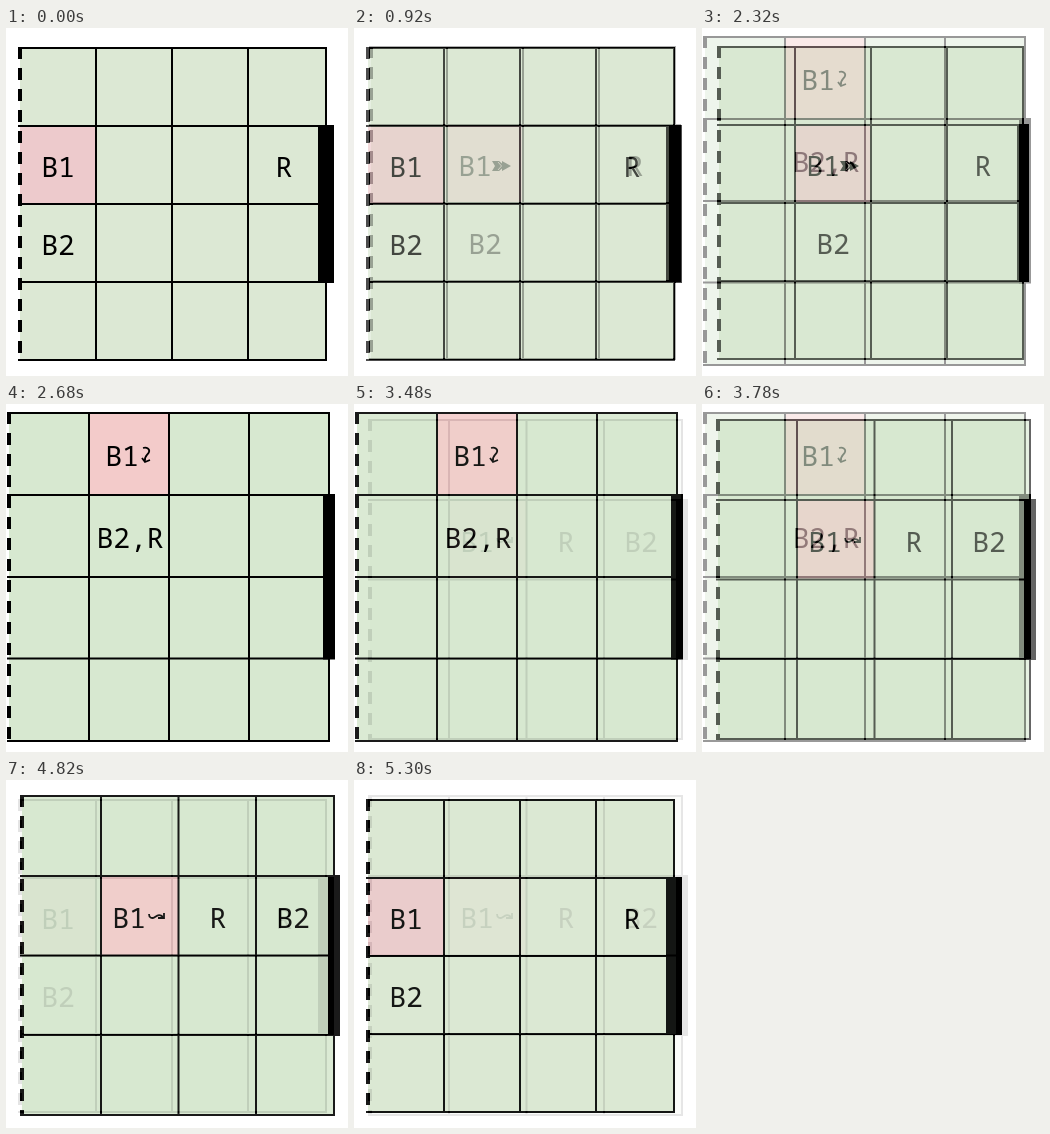
These frames come from a looping animation (342x348 px, 5.36 s). An HTML page:

```html
<!DOCTYPE html>
<html lang="en">
<head>
<meta charset="utf-8">
<title>Grid moves</title>
<style>
html, body { margin: 0; width: 100%; height: 100%; overflow: hidden; background: #fff; }
svg { position: absolute; left: 0; top: 0; width: 342px; height: 348px; }
text { font: 28px "Noto Sans Mono", monospace; }
</style>
</head>
<body>
<script>
const HOLD = 800, STEP = 60, STEPS = 9, PART = HOLD + STEP * STEPS;

const arrows = {
  right: '<path d="M138 133h7l3 2.5v-2.5l9 5-9 5v-2.5l-3 2.500h-7l3-5z"/>' +
    '<path d="M144 134l3.500 4-3.500 4" fill="none" stroke="#edcacc" stroke-width=".8"/>',
  down: '<g fill="none" stroke="#000" stroke-width="1.8">' +
    '<path d="M137 44c4-1 7 1 6 4-1 3-5 4-4 9"/><path d="M136 54l3 4 5-2"/></g>',
  wave: '<g fill="none" stroke="#000" stroke-width="1.8">' +
    '<path d="M143 134c0 4 3 5 6 3s5-3 8 0"/><path d="M158 133v5h-6"/></g>'
};

// xs, ys: grid lines; hot: row of the pink cell; bar: x and width
// labels: text, centre x, baseline
const slides = [
  { xs: [14, 90, 166, 242, 320], ys: [20, 98, 176, 254, 332], green: '#dce8d4', pink: '#edcacc',
    hot: [0, 1], bar: [312, 16], labels: [['B1', 52, 149], ['B2', 52, 227], ['R', 278, 149]] },
  { xs: [17, 93, 169, 245, 321], ys: [19, 97, 175, 253, 331], green: '#dce8d4', pink: '#edcacc',
    hot: [1, 1], bar: [315, 12], labels: [['B1', 121, 148], ['B2', 131, 226], ['R', 281, 148]], arrow: 'right' },
  { xs: [3, 83, 163, 243, 323], ys: [9, 91, 173, 254.5, 337], green: '#d7e8d0', pink: '#f3cbca',
    hot: [1, 0], bar: [317, 12], labels: [['B1', 116, 62], ['B2,R', 124, 144]], arrow: 'down' },
  { xs: [16, 95, 172.5, 250, 328], ys: [16, 96, 175.5, 255, 335], green: '#d7e8d0', pink: '#f3cbca',
    hot: [1, 1], bar: [322, 12], labels: [['B1', 123, 148], ['R', 212, 148], ['B2', 287, 148]], arrow: 'wave' }
];

const rect = (x, y, x2, y2, fill) =>
  `<rect x="${x}" y="${y}" width="${x2 - x}" height="${y2 - y}" fill="${fill}"/>`;

function draw({ xs, ys, green, pink, hot: [c, r], bar: [bx, bw], labels, arrow }) {
  const [left, , , , right] = xs, [top, , , , bottom] = ys;
  const lines = ys.map(y => `M${left - 2} ${y}H${right + 1}`).join('') +
    xs.slice(1).map(x => `M${x} ${top}V${bottom}`).join('');
  return '<svg viewBox="0 0 342 348">' + rect(0, 0, 342, 348, '#fff') +
    rect(left, top, right, bottom, green) +
    rect(xs[c], ys[r], xs[c + 1], ys[r + 1], pink) +
    `<path d="${lines}" stroke="#000" stroke-width="2"/>` +
    `<path d="M${left} ${top - 1}V${bottom}" stroke="#000" stroke-width="4" stroke-dasharray="12 9"/>` +
    rect(bx, ys[1] - 1, bx + bw, ys[3] + 1, '#000') +
    labels.map(([s, x, y]) => `<text x="${x}" y="${y}" text-anchor="middle">${s}</text>`).join('') +
    (arrow ? arrows[arrow] : '') + '</svg>';
}

document.body.innerHTML = slides.map(draw).join('');
const layers = [...document.querySelectorAll('svg')];
const start = performance.now();

function frame(now) {
  const t = Math.max(0, now - start) % (PART * slides.length);
  const cur = Math.floor(t / PART), next = (cur + 1) % slides.length;
  const past = t - cur * PART - HOLD;
  const mix = past < 0 ? 0 : (Math.floor(past / STEP) + 1) / (STEPS + 1);
  layers.forEach((el, i) => {
    el.style.opacity = i === cur ? 1 : i === next ? mix : 0;
    el.style.zIndex = i === next ? 1 : 0;
  });
  requestAnimationFrame(frame);
}
requestAnimationFrame(frame);
</script>
</body>
</html>
```
